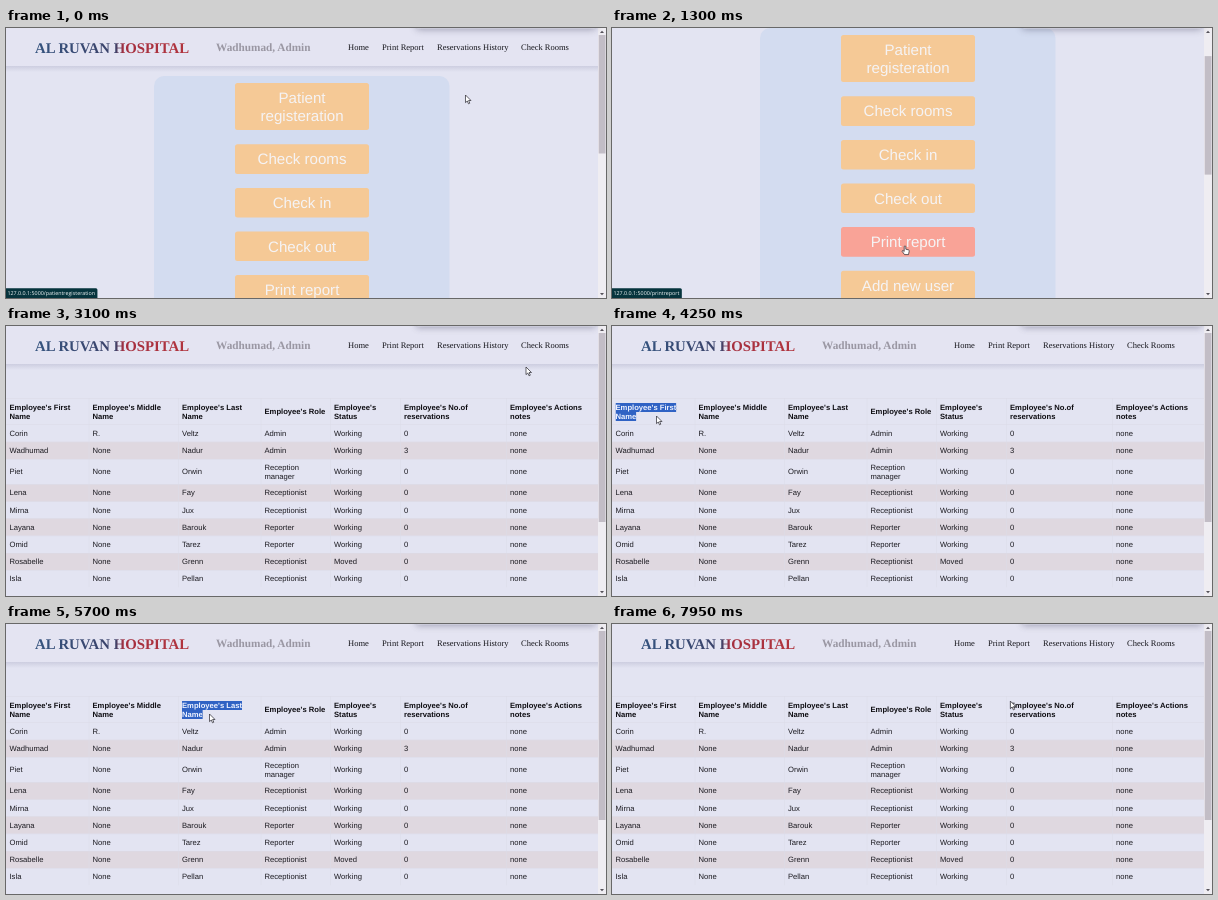
An HTML page with a canvas for the animation above (8000 ms loop, 600 by 270 pixels).

```html
<!DOCTYPE html>
<html lang="en">
<head>
<meta charset="utf-8">
<title>Hospital admin</title>
<style>
  html, body { margin: 0; width: 100%; height: 100%; overflow: hidden; background: #e3e4f2; }
  canvas { display: block; width: 600px; height: 270px; }
</style>
</head>
<body>
<canvas id="stage"></canvas>
<script>
const LOOP = 8000, PAGE_SWITCH = 1500;
const SANS = '"Liberation Sans", Arial, sans-serif';
const SERIF = '"Liberation Serif", "Times New Roman", serif';
const HEAD_FONT = `bold 7.65px ${SANS}`, CELL_FONT = `7.65px ${SANS}`;

const canvas = document.getElementById('stage');
const ctx = canvas.getContext('2d');
const dpr = window.devicePixelRatio || 1;
canvas.width = 600 * dpr;
canvas.height = 270 * dpr;
ctx.scale(dpr, dpr);
ctx.textRendering = 'geometricPrecision';

const buttons = [
  { lines: ['Patient', 'registeration'], y: 55, h: 47 },
  ...['Check rooms', 'Check in', 'Check out', 'Print report', 'Add new user']
    .map((label, i) => ({ lines: [label], y: 116.3 + i * 43.6, h: 29.6 }))
];

const columns = [
  { x: 3.5, lines: ["Employee's First", 'Name'], dragX: 44.5 },
  { x: 86.5, lines: ["Employee's Middle", 'Name'], dragX: 116 },
  { x: 176, lines: ["Employee's Last", 'Name'], dragX: 203.5 },
  { x: 258.5, lines: ["Employee's Role"], dragX: 321 },
  { x: 328, lines: ["Employee's", 'Status'], dragX: 358 },
  { x: 398, lines: ["Employee's No.of", 'reservations'], dragX: 450 },
  { x: 504, lines: ["Employee's Actions", 'notes'], dragX: 530 }
];

const rows = [
  ['Corin', 'R.', 'Veltz', 'Admin'],
  ['Wadhumad', 'None', 'Nadur', 'Admin', 'Working', '3'],
  ['Piet', 'None', 'Orwin', 'Reception\nmanager'],
  ['Lena', 'None', 'Fay', 'Receptionist'],
  ['Mirna', 'None', 'Jux', 'Receptionist'],
  ['Layana', 'None', 'Barouk', 'Reporter'],
  ['Omid', 'None', 'Tarez', 'Reporter'],
  ['Rosabelle', 'None', 'Grenn', 'Receptionist', 'Moved'],
  ['Isla', 'None', 'Pellan', 'Receptionist']
].map(([first, middle, last, role, status = 'Working', count = '0']) =>
  [first, middle, last, role, status, count, 'none']);

// Press times of the drags that select the column headings one by one.
const dragStarts = [3950, 4700, 5430, 6200, 7050, 7940];
const DRAG = 230;

const cursorPath = [
  [0, 459.5, 67], [250, 456, 69], [450, 456, 69], [800, 400, 195],
  [1150, 293, 218], [1650, 293, 218], [2450, 520, 41], [3250, 520, 41]
];
dragStarts.forEach((start, i) => {
  const { x, dragX } = columns[i];
  cursorPath.push([start - 50, x, 77], [start, x, 77],
    [start + DRAG, dragX, 90], [start + DRAG + 130, dragX, 90]);
});

const smooth = p => p * p * (3 - 2 * p);
const clamp = p => p < 0 ? 0 : Math.min(1, p);

function cursorAt(t) {
  const next = cursorPath.findIndex(key => key[0] > t);
  const [t0, x0, y0] = cursorPath[next - 1], [t1, x1, y1] = cursorPath[next];
  const p = smooth((t - t0) / (t1 - t0));
  return { x: x0 + (x1 - x0) * p, y: y0 + (y1 - y0) * p };
}

function rect(x, y, w, h, fill, radius = 0) {
  ctx.fillStyle = fill;
  ctx.beginPath();
  ctx.roundRect(x, y, w, h, radius);
  ctx.fill();
}

function text(str, x, baseline, font, fill, align = 'left') {
  ctx.font = font;
  ctx.fillStyle = fill;
  ctx.textAlign = align;
  ctx.fillText(str, x, baseline);
}

function verticalFade(y0, y1, from, to) {
  const g = ctx.createLinearGradient(0, y0, 0, y1);
  g.addColorStop(0, from);
  g.addColorStop(1, to);
  return g;
}

function drawHeader() {
  rect(0, 0, 592, 38, '#e4e4f2');
  rect(0, 38, 592, 6, verticalFade(38, 44, 'rgba(90,90,130,.16)', 'rgba(90,90,130,0)'));
  const title = ctx.createLinearGradient(29, 0, 187, 0);
  title.addColorStop(0, '#35547f');
  title.addColorStop(.51, '#3b4169');
  title.addColorStop(.56, '#a52f3f');
  title.addColorStop(1, '#b2353e');
  text('AL RUVAN HOSPITAL', 29, 24.5, `bold 14.8px ${SERIF}`, title);
  text('Wadhumad, Admin', 210, 23, `bold 11.25px ${SERIF}`, '#9a97a3');
  [['Home', 342], ['Print Report', 376], ['Reservations History', 431], ['Check Rooms', 515]]
    .forEach(([label, x]) => text(label, x, 22, `8.5px ${SERIF}`, '#17171d'));
}

function drawScrollbar(top, height) {
  rect(592, 0, 8, 270, '#efedf2');
  rect(592.7, top, 6.8, height, '#c2bdc6');
  ctx.fillStyle = '#55525a';
  for (const [y, dir] of [[4, -1], [266, 1]]) {
    ctx.beginPath();
    ctx.moveTo(594, y - dir);
    ctx.lineTo(598, y - dir);
    ctx.lineTo(596, y + dir * 1.3);
    ctx.fill();
  }
}

function drawTopShadow() {
  ctx.save();
  ctx.shadowColor = 'rgba(70,70,100,.45)';
  ctx.shadowBlur = 7 * dpr;
  ctx.shadowOffsetY = dpr;
  rect(410, -8, 180, 8.5, '#dcdce8', 3);
  ctx.restore();
}

function drawHome(t, cursor) {
  const scroll = 48 * smooth(clamp((t - 30) / 210));
  let hovering = false;
  ctx.save();
  ctx.translate(0, -scroll);
  drawHeader();
  rect(148, 48, 295.5, 400, '#d3dcf0', 10);
  for (const { lines, y, h } of buttons) {
    const hit = cursor.x > 229 && cursor.x < 363 &&
      cursor.y + scroll > y && cursor.y + scroll < y + h;
    hovering ||= hit;
    rect(229, y, 134, h, hit ? '#f9a397' : '#f5c996', 2.5);
    lines.forEach((line, i) => {
      const middle = y + h / 2 + (i - (lines.length - 1) / 2) * 17.6;
      text(line, 296, middle + 5.2, `15.1px ${SANS}`, '#f5f3f4', 'center');
    });
  }
  ctx.restore();
  drawScrollbar(7 + scroll * .44, 118.5);
  drawTopShadow();
  const status = '127.0.0.1:5000/' + (t < 900 ? 'patientregisteration' : 'printreport');
  const statusFont = '5.35px "Open Sans", sans-serif';
  ctx.font = statusFont;
  rect(0, 260.3, ctx.measureText(status).width + 4, 9.7, '#06343d', [0, 1.5, 0, 0]);
  text(status, 1.5, 267.2, statusFont, '#f2f6f7');
  return hovering;
}

function drawSelection(t, cursor) {
  const index = dragStarts.findLastIndex(start => t >= start);
  if (index < 0) return;
  const { x, lines } = columns[index];
  const dragging = t < dragStarts[index] + DRAG;
  const activeLine = lines.length > 1 && cursor.y > 85.5 ? 1 : 0;
  ctx.font = HEAD_FONT;
  lines.forEach((line, i) => {
    const full = ctx.measureText(line).width;
    let width = full;
    if (dragging) width = i < activeLine ? full : i > activeLine ? 0 : Math.min(full, cursor.x - x);
    if (width <= 0) return;
    const top = lines.length > 1 ? 77 + i * 9 : 81;
    ctx.save();
    ctx.beginPath();
    ctx.rect(x, top, width, 9);
    ctx.clip();
    rect(x, top, width, 9, '#2f62c4');
    text(line, x, top + 6.9, HEAD_FONT, '#eef2ff');
    ctx.restore();
    ctx.font = HEAD_FONT;
  });
}

function drawReport(t, cursor) {
  drawHeader();
  let y = 98.6;
  rows.forEach((row, r) => {
    const height = row[3].includes('\n') ? 25.4 : 17.15;
    if (r % 2) rect(0, y, 592, height, '#dfd8e0');
    rect(0, y, 592, .5, '#dcdce8');
    row.forEach((cell, c) => {
      const lines = cell.split('\n');
      lines.forEach((line, i) => text(line, columns[c].x,
        y + height / 2 + 2.6 + (i - (lines.length - 1) / 2) * 8.8, CELL_FONT, '#1b1a20'));
    });
    y += height;
  });
  rect(0, 72, 592, .5, '#dcdce8');
  columns.forEach(({ x, lines }) => {
    if (x > 10) rect(x - 3.7, 72, .5, y - 72, '#dcdce8');
    lines.forEach((line, i) =>
      text(line, x, lines.length > 1 ? 83.9 + i * 9 : 87.9, HEAD_FONT, '#0e0d12'));
  });
  drawSelection(t, cursor);
  drawScrollbar(7, 189);
  drawTopShadow();
}

const arrow = new Path2D('M0 0V7.6L1.8 6L3 8.8L4.3 8.2L3.1 5.5H5.5Z');
const hand = new Path2D('M-.8 .4Q0-.6 .8 .4V3.2L3.6 3.9Q4.4 4.2 4.2 5.2L3.5 8.6H-.5L-2.9 5.3Q-2.8 4.2-1.8 4.7L-.8 5.5Z');

function drawCursor({ x, y }, shape) {
  ctx.save();
  ctx.translate(x, y);
  ctx.fillStyle = '#fff';
  ctx.strokeStyle = '#24232b';
  ctx.lineWidth = .7;
  ctx.fill(shape);
  ctx.stroke(shape);
  ctx.restore();
}

function draw(t) {
  const cursor = cursorAt(t);
  rect(0, 0, 600, 270, '#e3e4f2');
  let hovering = false;
  if (t < PAGE_SWITCH) hovering = drawHome(t, cursor);
  else drawReport(t, cursor);
  drawCursor(cursor, hovering ? hand : arrow);
}

const begin = performance.now();
function tick() {
  draw((performance.now() - begin) % LOOP);
  requestAnimationFrame(tick);
}
tick();
</script>
</body>
</html>
```
